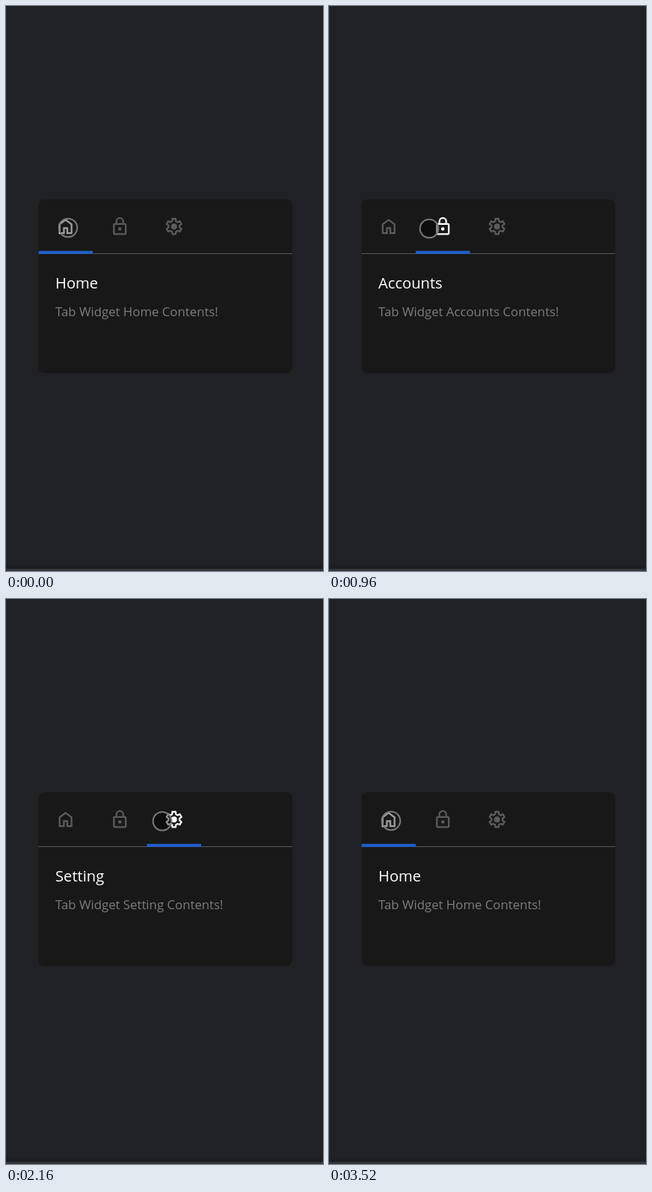
Animation of 424x754 px, one loop 3600 ms. Source, as an HTML page:

```html
<!DOCTYPE html>
<html lang="en">
<head>
<meta charset="utf-8">
<title>Tab widget</title>
<style>
  html, body { margin: 0; width: 100%; height: 100%; overflow: hidden; background: #202125; }
  svg { display: block; width: 424px; height: 754px; font-family: "Open Sans", "Noto Sans", sans-serif; }
  .icon { fill: none; stroke: #5c5c5c; stroke-width: 2; }
  .icon circle { fill: #5c5c5c; stroke: none; }
  .icon.on { stroke: #fff; }
  .icon.on circle { fill: #fff; }
  .title { font-size: 20.2px; font-weight: 500; fill: #fff; }
  .text { font-size: 16.8px; fill: #7d7d7d; }
</style>
</head>
<body>
<svg viewBox="0 0 424 754">
  <defs>
    <clipPath id="card"><rect x="43.5" y="258" width="339.5" height="232" rx="8"/></clipPath>
    <linearGradient id="shade" x2="0" y2="1">
      <stop stop-color="#202125"/><stop offset="1" stop-color="#1b1c1f"/>
    </linearGradient>
  </defs>
  <rect width="424" height="754" fill="#202125"/>
  <rect width="1" height="754" fill="#292a2e"/>
  <rect y="743" width="424" height="8" fill="url(#shade)"/>
  <rect y="751" width="424" height="3" fill="#343538"/>
  <g clip-path="url(#card)">
    <rect x="43" y="258" width="341" height="232" fill="#181818"/>
    <g id="pages"></g>
    <rect x="43" y="330" width="341" height="1" fill="#585858"/>
    <rect id="bar" y="326.8" width="72.5" height="4" fill="#1f5fcb"/>
  </g>
  <rect id="flash" y="258" width="72.5" height="72.5" fill="#3cbbfa"/>
  <g class="icon"><path d="M5 20V9.5l7-5.25 7 5.25V20h-5v-6h-4v6z"/></g>
  <g class="icon">
    <rect x="5" y="9" width="14" height="12" rx="1"/>
    <path d="M8 8V6a4 4 0 0 1 8 0v2"/><circle cx="12" cy="15" r="2"/>
  </g>
  <g class="icon"><path id="gear" transform="translate(12 12)"/><circle cx="12" cy="12" r="3.5"/></g>
  <circle id="cursor" r="12.3" fill-opacity=".42" stroke="#7a7a7a" stroke-width="2"/>
</svg>
<script>
  const LOOP = 3600, STEP = 80, LEFT = 43.5, TAB = 72.5, PAGE = 339.5;
  const $ = id => document.getElementById(id);
  const icons = [...document.querySelectorAll('.icon')];
  const [pages, bar, flash, cursor] = ['pages', 'bar', 'flash', 'cursor'].map($);

  // Time at which each tab is tapped; the first falls before the loop point
  const taps = [-389, 630, 1830];

  // Pointer stops; sway bends the way there down and to the left
  const home = { x: 83, y: 296, grey: 28 };
  const moves = [
    { start: 80, time: 320, sway: 40, to: { x: 134, y: 297, grey: 0 } },
    { start: 1120, time: 380, sway: 40, to: { x: 209, y: 296.5, grey: 0 } },
    { start: 2480, time: 500, sway: 0, to: home }
  ];

  const clamp = v => Math.min(1, Math.max(0, v));
  const mix = (a, b, k) => a + (b - a) * k;
  const easeOut = (k, power) => 1 - (1 - clamp(k)) ** power;
  const smooth = k => k * k * (3 - 2 * k);

  ['Home', 'Accounts', 'Setting'].forEach((name, i) => {
    const x = 66 + i * PAGE;
    pages.innerHTML += `<text class="title" x="${x}" y="377">${name}</text>
      <text class="text" x="${x}" y="414.3">Tab Widget ${name} Contents!</text>`;
    icons[i].setAttribute('transform', `translate(${LEFT + TAB * (i + .5) - 13.6} 280.6) scale(1.132)`);
  });

  function gearPath() {
    const tooth = [[-2.3, -6.15], [-1.87, -9], [1.87, -9], [2.3, -6.15]];
    const points = [];
    for (let i = 0; i < 6; i++) {
      const c = Math.cos(i * Math.PI / 3), s = Math.sin(i * Math.PI / 3);
      for (const [x, y] of tooth) points.push(`${x * c - y * s} ${x * s + y * c}`);
    }
    return `M${points.join('L')}Z`;
  }
  $('gear').setAttribute('d', gearPath());

  function pointerAt(t) {
    let from = home;
    for (const { start, time, sway, to } of moves) {
      const k = clamp((t - start) / time), e = smooth(k);
      const bend = sway * Math.sin(Math.PI * k) * (1 - k) ** 2;
      from = {
        x: mix(from.x, to.x, e) - bend,
        y: mix(from.y, to.y, e) + bend * 1.2,
        grey: mix(from.grey, to.grey, e)
      };
    }
    return from;
  }

  function draw(t) {
    const to = taps.filter(tap => tap <= t).length - 1;
    const from = (to + 2) % 3;
    const age = t - taps[to];
    const scroll = mix(from, to, easeOut(age / 250, 2));
    pages.setAttribute('transform', `translate(${-scroll * PAGE} 0)`);
    bar.setAttribute('x', LEFT + TAB * mix(from, to, easeOut(age / 200, 3)));
    flash.setAttribute('x', LEFT + TAB * to);
    flash.setAttribute('opacity', .5 * clamp(1 - age / 170));
    icons.forEach((icon, i) => icon.classList.toggle('on', i === to));

    const { x, y, grey } = pointerAt(t);
    cursor.setAttribute('cx', x);
    cursor.setAttribute('cy', y);
    cursor.setAttribute('fill', `rgb(${grey},${grey},${grey})`);
  }

  function tick() {
    const t = Math.floor(performance.now() % LOOP / STEP) * STEP;
    draw(t < LOOP + taps[0] ? t : t - LOOP);
    requestAnimationFrame(tick);
  }
  tick();
</script>
</body>
</html>
```
